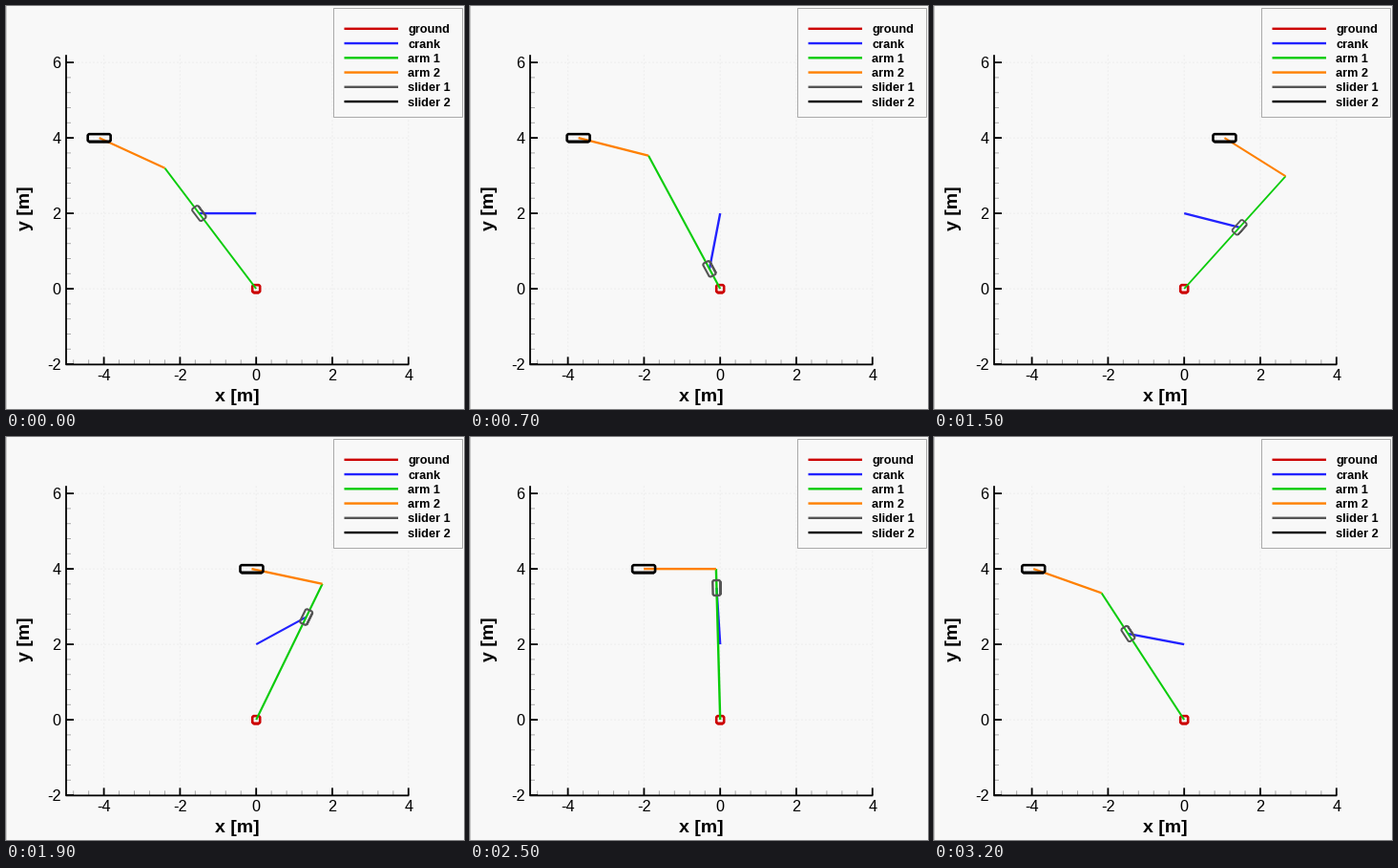
Write a matplotlib script that moves like this. It is 480 px wide and 422 px high and loops after 3.3 s.

```python
import numpy as np
import matplotlib.pyplot as plt
from matplotlib.animation import FuncAnimation

W, H, DPI = 480, 422, 100
PX = 72 / DPI  # points per pixel
FRAMES, STEPS = 33, 100
CRANK, ARM1, ARM2 = 1.5, 4.0, 1.9
PIVOT_Y, RAIL_Y = 2.0, 4.0
BG = "#f8f8f8"
PARTS = [
    ("ground", "#cc0000", 2.6),
    ("crank", "#2222ff", 2.4),
    ("arm 1", "#0acc0a", 2.4),
    ("arm 2", "#ff8000", 2.4),
    ("slider 1", "#555555", 2.4),
    ("slider 2", "#000000", 2.6),
]

plt.rcParams["font.family"] = "Liberation Sans"
fig = plt.figure(figsize=(W / DPI, H / DPI), dpi=DPI, facecolor=BG)
ax = fig.add_axes([0, 0, 1, 1])
ax.set_xlim(0, W)
ax.set_ylim(H, 0)
ax.axis("off")


def sx(x):
    return 262.2 + 39.9 * np.asarray(x)


def sy(y):
    return 296.1 - 39.5 * np.asarray(y)


def line(xs, ys, color, width, **kw):
    return ax.plot(xs, ys, color=color, lw=width * PX, snap=False,
                   solid_capstyle="butt", **kw)[0]


def label(x, y, text, size, **kw):
    ax.text(x, y, text, fontsize=size * PX, color="black",
            va="baseline", **kw)


def draw_axes():
    left, right, top, bottom = 63, 422.3, 51.2, 375.4
    line([0.5, 0.5], [0, H], "#cccccc", 1)
    for v in (-4, -2, 0, 2, 4):
        line([sx(v)] * 2, [top, bottom], "#eeeeee", 1, ls=(0, (2, 2)))
    for v in (0, 2, 4, 6):
        line([left, right], [sy(v)] * 2, "#eeeeee", 1, ls=(0, (2, 2)))

    for v in np.arange(-4.8, 4, 0.4):
        line([sx(v)] * 2, [bottom - 5, bottom], "#aaaaaa", 1)
    for v in np.arange(-1.6, 6.1, 0.4):
        line([left, left + 5], [sy(v)] * 2, "#aaaaaa", 1)
    for v in (-4, -2, 0, 2, 4):
        line([sx(v)] * 2, [bottom - 8, bottom], "black", 1.8)
        label(sx(v), 391.5, str(v), 16.3, ha="center")
    for v in (-2, 0, 2, 4, 6):
        line([left, left + 8], [sy(v)] * 2, "black", 1.8)
        label(57.5, sy(v) + 5.8, str(v), 16.3, ha="right")
    line([left, left, right], [top, bottom, bottom], "black", 1.8)

    label(242.7, 414.5, "x [m]", 19.5, ha="center", weight="bold")
    label(24.7, 212, "y [m]", 19.5, ha="center", weight="bold",
          rotation=90, rotation_mode="anchor")


def draw_legend():
    ax.add_patch(plt.Rectangle((342.5, 1.5), 135, 114.5, facecolor=BG,
                               edgecolor="#aaaaaa", lw=PX, zorder=3))
    for i, (name, color, _) in enumerate(PARTS):
        y = 23.8 + 15.25 * i
        line([354.5, 411], [y, y], color, 2.4, zorder=4)
        label(421, y + 4.5, name, 12.75, weight="bold", zorder=4)


def box(cx, cy, length, height, angle=0.0, cut=0.03):
    """Closed outline of a rotated rectangle with cut corners."""
    a, b = length / 2, height / 2
    p, q = a - cut, b - cut
    u = np.array([-p, p, a, a, p, -p, -a, -a, -p, p])
    v = np.array([-b, -b, -q, q, b, b, q, -q, -b, -b])
    c, s = np.cos(angle), np.sin(angle)
    return cx + c * u - s * v, cy + s * u + c * v


def pose(step):
    """Outlines of all parts for one step of the crank."""
    theta = np.pi + 2 * np.pi * step / STEPS
    px, py = CRANK * np.cos(theta), PIVOT_Y + CRANK * np.sin(theta)
    swing = np.arctan2(py, px)
    ex, ey = ARM1 * np.cos(swing), ARM1 * np.sin(swing)
    rail_x = ex - np.sqrt(ARM2**2 - (RAIL_Y - ey)**2)
    return [
        box(0, 0, 0.2, 0.2),
        ([0, px], [PIVOT_Y, py]),
        ([0, ex], [0, ey]),
        ([ex, rail_x], [ey, RAIL_Y]),
        box(px, py, 0.4, 0.2, swing),
        box(rail_x, RAIL_Y, 0.6, 0.2),
    ]


def slant(x, y):
    """Thinning of a stroke whose width is measured along an axis."""
    dx, dy = abs(x[1] - x[0]), abs(y[1] - y[0])
    return max(dx, dy) / np.hypot(dx, dy)


draw_axes()
draw_legend()
links = [line([], [], color, width, zorder=2, solid_joinstyle="round")
         for _, color, width in PARTS]


def update(i):
    step = -(-i * STEPS // FRAMES)  # whole steps, rounded up
    for link, (x, y), (_, _, width) in zip(links, pose(step), PARTS):
        link.set_data(sx(x), sy(y))
        link.set_linewidth(width * slant(x, y) * PX)
    return links


anim = FuncAnimation(fig, update, frames=FRAMES, interval=100,
                     repeat=True, repeat_delay=0, blit=False)
plt.show()
```
